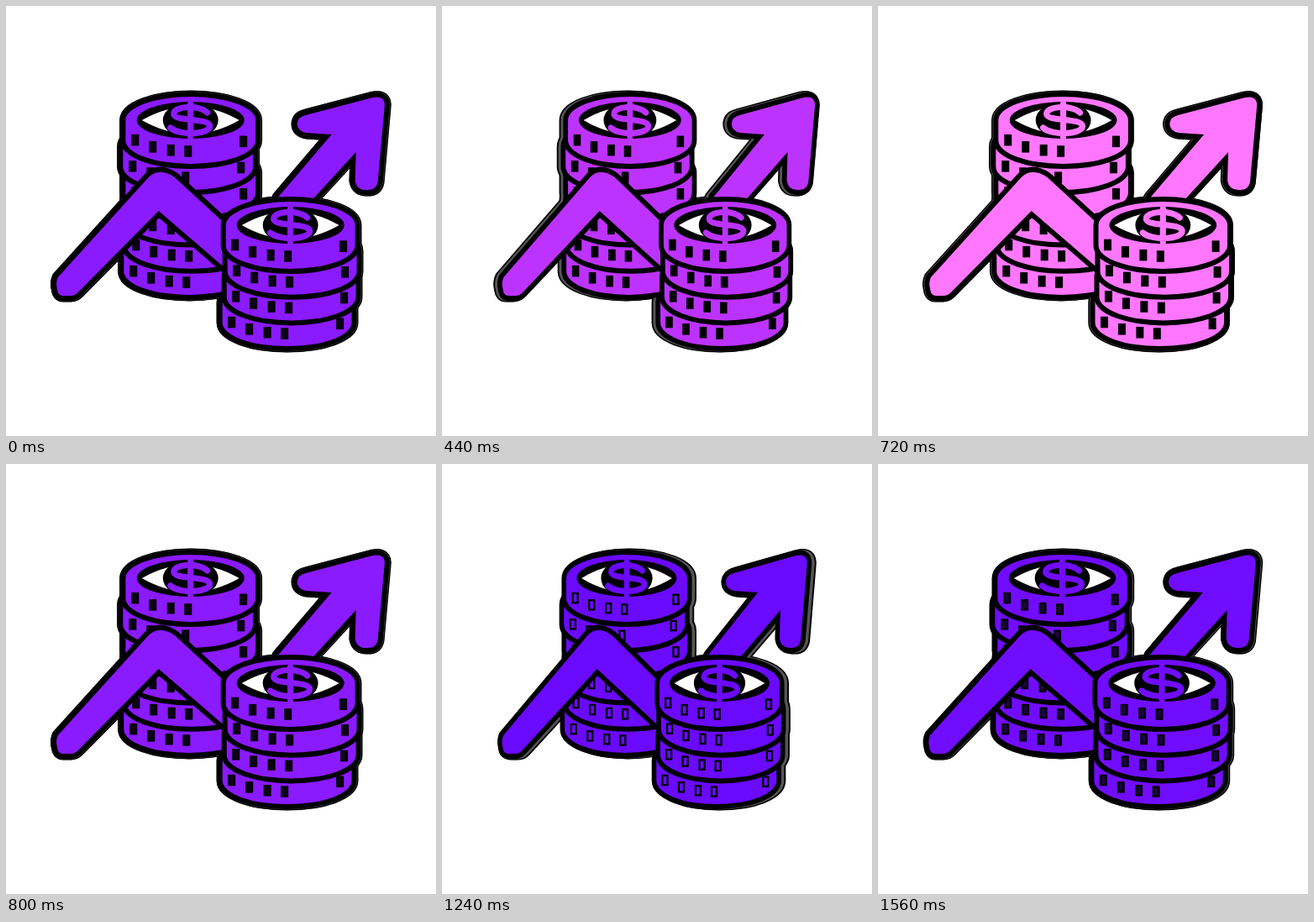
Animation, 512 px wide and 512 px high, one loop 1.6 s. Source, as an HTML page with a canvas:

```html
<!DOCTYPE html>
<html lang="en">
<head>
<meta charset="utf-8">
<title>Coins and rising arrow</title>
<style>
html, body { margin: 0; width: 100%; height: 100%; overflow: hidden; background: #fff; }
canvas { display: block; width: 100vmin; height: 100vmin; }
</style>
</head>
<body>
<canvas id="stage" width="512" height="512"></canvas>
<script>
const ctx = document.getElementById('stage').getContext('2d');
const LOOP = 1600, STEP = 40, CENTER = 256, FRONT = 7;
const SLOTS = [-66, -45, -23.5, -3, 63];

const tail = new Path2D('M62 323 L169 205 Q182 191 201 204 L275 272 L268 318 L182 244 L86 341 Q82 345 77 345 H68 Q62 345 61 337 Q59 329 62 323Z');
const head = new Path2D('M357 130 L437 109 Q453 106 451 121 L443 210 Q441 219 431 219 Q418 220 416 208 L417 174 L362 234 L324 228 L388 153 L358 151 Q347 149 347 140 Q348 132 357 130Z');
const lens = new Path2D('M-58 0 Q0 -33 58 0 Q0 33 -58 0Z');
const dollar = new Path2D('M20 -9 C10 -19 -21 -17 -20 -7 C-18 2 22 -3 23 7 C23 17 -13 19 -24 9 M0 -20 V20');

// Centres run from the top coin to the bottom one.
const makeStack = (rx, bottom, gap, centers) => centers.map((x, i) => {
  const y = bottom + i * gap - 28;
  const body = new Path2D();
  body.ellipse(x, y - 24, rx, 28, 0, Math.PI, 2 * Math.PI);
  body.ellipse(x, y, rx, 28, 0, 0, Math.PI);
  body.closePath();
  return { x, y, rx, body };
});
const backStack = makeStack(77.5, 188, 31.2, [220, 217, 220, 220, 221, 218]);
const frontStack = makeStack(77, 313, 30.7, [339, 341, 340, 335]);
const shapes = [head, tail, ...[...backStack, ...frontStack].map(coin => coin.body)];

function outline(shape, radius, color) {
  ctx.strokeStyle = color;
  ctx.lineWidth = radius * 2;
  ctx.stroke(shape);
}

function drawPiece(shape, color) {
  outline(shape, 6, '#000');
  ctx.fillStyle = color;
  ctx.fill(shape);
}

function drawOval(rx, ry) {
  ctx.beginPath();
  ctx.ellipse(0, 0, rx, ry, 0, 0, 2 * Math.PI);
  ctx.fill();
}

function drawFace({ x, y }, color) {
  ctx.save();
  ctx.translate(x, y - 24);
  ctx.fillStyle = '#000';
  drawOval(64, 22);
  ctx.fillStyle = '#fff';
  ctx.fill(lens);
  ctx.fillStyle = '#000';
  drawOval(33, 22);
  outline(dollar, 3.6, color);
  ctx.restore();
}

// The inner wall of a slot catches colour when the coins turn left.
function drawSlot(x, y, color, wall) {
  ctx.fillStyle = '#000';
  ctx.fillRect(x - 4.5, y - 6.75, 9, 13.5);
  ctx.globalAlpha = wall;
  ctx.fillStyle = color;
  ctx.fillRect(x - 2, y - 4.5, 4, 9);
  ctx.globalAlpha = 1;
}

function drawStack(coins, color, wall) {
  for (const coin of [...coins].reverse()) {
    drawPiece(coin.body, color);
    for (const dx of SLOTS) {
      const edge = coin.y + 28 * Math.sqrt(1 - (dx / coin.rx) ** 2);
      drawSlot(coin.x + dx, edge - 15, color, wall);
    }
  }
  drawFace(coins[0], color);
}

function draw(ms) {
  const swing = Math.sin(2 * Math.PI * ms / LOOP);
  const angle = (20 * swing - 2) * Math.PI / 180;
  const cos = Math.cos(angle), sin = Math.sin(angle);
  const shine = Math.exp(2.77 + 8.6 * swing - 7.74 * swing * swing);
  const color = `rgb(${Math.min(255, 106 + 2 * shine)}, ${10 + shine}, 255)`;
  const wall = Math.min(1, Math.max(0, -3 * sin));
  const setDepth = z => ctx.setTransform(cos, 0, 0, 1, CENTER * (1 - cos) + z * sin, 0);

  ctx.setTransform(1, 0, 0, 1, 0, 0);
  ctx.fillStyle = '#fff';
  ctx.fillRect(0, 0, 512, 512);
  ctx.lineJoin = ctx.lineCap = 'round';

  for (const [z, radius, shade] of [[-4, 7.5, '#000'], [2, 7.2, '#000'], [-2, 6.2, '#555']]) {
    setDepth(z);
    for (const shape of shapes) outline(shape, radius, shade);
  }

  setDepth(FRONT);
  drawPiece(head, color);
  drawStack(backStack, color, wall);
  drawPiece(tail, color);
  drawStack(frontStack, color, wall);
}

function tick() {
  draw(Math.floor(performance.now() % LOOP / STEP) * STEP);
  requestAnimationFrame(tick);
}
tick();
</script>
</body>
</html>
```
